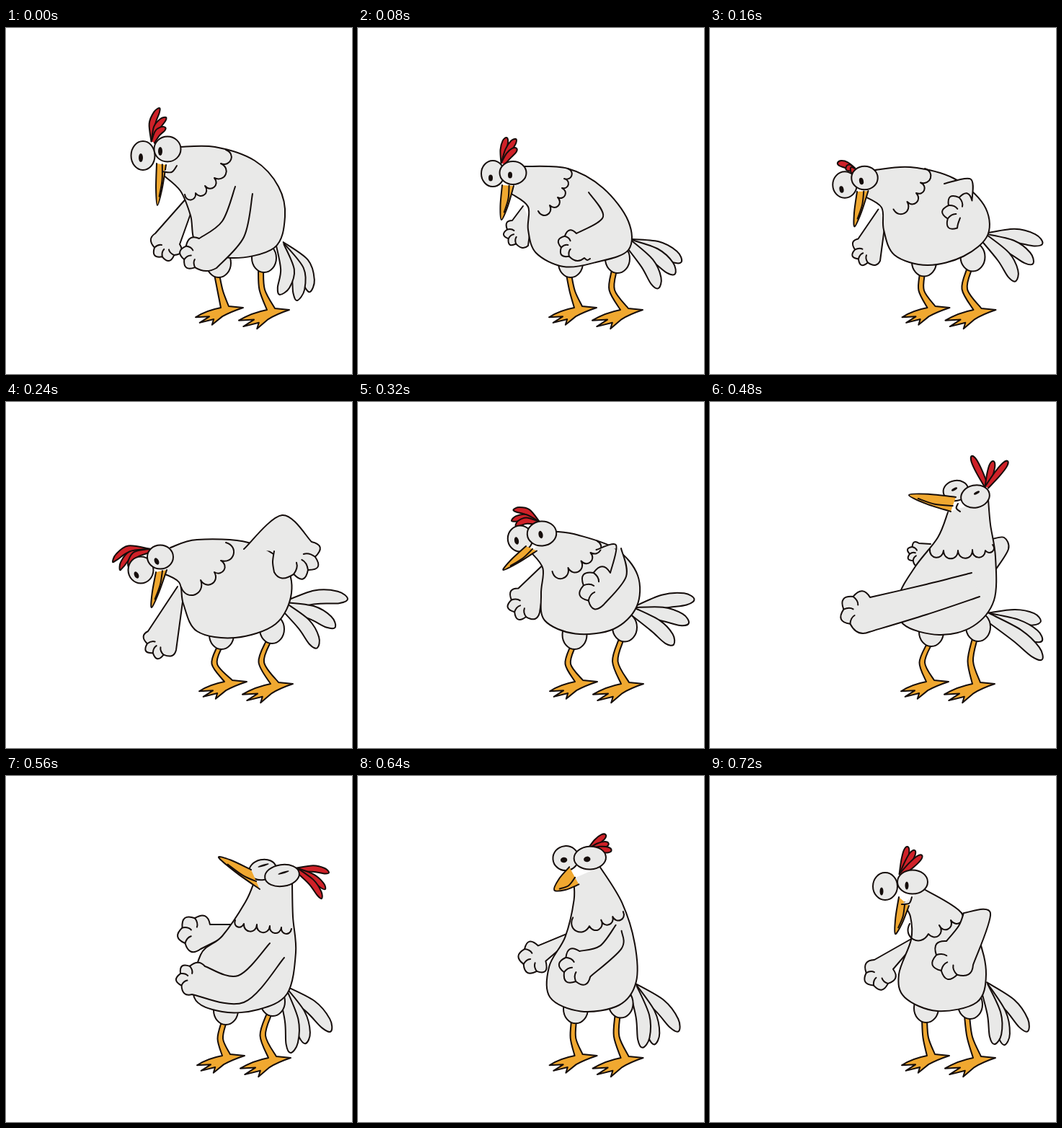
An HTML page with a canvas for the animation above (800 ms loop, 480 by 480 pixels).

```html
<!DOCTYPE html>
<html lang="en">
<head>
<meta charset="utf-8">
<title>Dancing hen</title>
<style>
html, body { margin: 0; width: 100%; height: 100%; overflow: hidden; background: #fff; }
canvas { display: block; width: 100vw; height: 100vh; }
</style>
</head>
<body>
<canvas id="stage" width="480" height="480"></canvas>
<script>
const INK = '#150d0b', PLUME = '#e9e9e8', HORN = '#f0a830', RED = '#cf2128';
const STEP = 80;
const ctx = document.getElementById('stage').getContext('2d');

// body, collar, beak, smile, thighs: points. tail, crest: root, then three tips.
// eyes: centre, pupil, radii, tilt. hands: centre, radius, turning direction.
// legs: both knees and the shift of the feet.
const crouch = {
  body: [240, 165, 290, 165, 345, 184, 378, 220, 387, 262, 372, 305, 312, 319, 265, 300, 256, 260, 242, 226, 218, 204],
  collar: [305, 169, 298, 188, 289, 208, 276, 219, 263, 229, 248, 231],
  near: { up: [318, 220, 300, 268, 268, 292], hand: [264, 314, 21, -1], down: [292, 333, 330, 290, 342, 230] },
  far: { up: [253, 233, 207, 285], hand: [223, 301, 20, -1], down: [241, 300, 256, 258] },
  tail: [380, 300, 422, 366, 404, 378, 380, 370], sweep: -0.15,
  crest: [204, 158, 213, 111, 222, 124, 221, 138], curl: -0.12,
  farEye: [190, 177, 187, 180, 16.5, 20, 0], nearEye: [224, 168, 214, 171, 18.5, 17.5, 0], pupil: [3, 6, 0],
  beak: [209, 188, 222, 190, 210, 246], smile: [217, 199, 237, 191],
  thighs: [295, 326, 358, 319], legs: [297, 355, -2]
};
const duck = {
  body: [230, 192, 291, 195, 340, 222, 375, 268, 375, 308, 330, 325, 285, 331, 247, 312, 236, 280, 236, 248, 213, 230],
  collar: [291, 195, 286, 209, 283, 222, 277, 235, 266, 246, 250, 254],
  near: { up: [320, 228, 340, 262, 303, 285], hand: [298, 301, 19, -1], down: [314, 319, 318, 322, 322, 320] },
  far: { up: [229, 247, 214, 267], hand: [222, 284, 18, -1], down: [236, 302, 240, 270] },
  tail: [375, 298, 449, 324, 440, 341, 417, 361], sweep: -0.08,
  crest: [201, 188, 206, 152, 219, 154, 220, 167], curl: -0.05,
  farEye: [187, 202, 184, 208, 16, 18, 0], nearEye: [215, 201, 211, 204, 18.5, 16, 0], pupil: [3, 4.5, 0],
  beak: [200, 218, 216, 219, 199, 266],
  thighs: [295, 326, 360, 320], legs: [297, 352, 0]
};
const swing = {
  body: [228, 202, 265, 191, 336, 195, 385, 223, 396, 265, 374, 308, 318, 327, 265, 318, 246, 280, 240, 250, 213, 236],
  collar: [305, 195, 298, 220, 289, 236, 270, 247, 243, 257],
  near: { up: [330, 204, 383, 157, 424, 194], hand: [402, 212, 31, 1], down: [372, 236, 370, 222, 372, 207] },
  far: { up: [238, 256, 197, 318], hand: [214, 333, 21, -1], down: [236, 344, 246, 270] },
  tail: [385, 283, 474, 273, 457, 312, 432, 341], sweep: -0.08,
  crest: [200, 206, 148, 222, 158, 233, 170, 229], curl: 0.2,
  farEye: [187, 233, 181, 240, 17.5, 18.5, 0], nearEye: [214, 215, 209, 221, 18, 16.5, 0], pupil: [3, 5, -25],
  beak: [208, 236, 223, 233, 202, 285],
  thighs: [299, 323, 369, 315], legs: [289, 354, 3]
};
const rise = {
  body: [316, 157, 345, 178, 380, 213, 391, 258, 377, 303, 335, 322, 285, 316, 253, 288, 262, 252, 273, 212, 266, 180],
  collar: [358, 190, 347, 198, 330, 205, 313, 213, 296, 213, 275, 205],
  near: { up: [331, 206, 333, 240, 276, 280], hand: [270, 305, 23, -1], down: [310, 326, 374, 262, 358, 199] },
  far: { up: [273, 198, 248, 199], hand: [250, 224, 24, -1], down: [268, 240, 273, 215] },
  tail: [378, 298, 459, 274, 461, 301, 444, 332], sweep: -0.04,
  crest: [301, 130, 283, 77, 268, 96, 267, 114], curl: 0.12,
  farEye: [263, 146, 259, 145, 17, 17.5, 0], nearEye: [296, 150, 298, 147, 22.5, 17.5, -8], pupil: [3, 5.5, 0],
  beak: [258, 164, 273, 180, 201, 181], smile: [267, 174, 292, 168],
  thighs: [302, 323, 371, 310], legs: [293, 359, -1]
};
const point = {
  body: [386, 135, 389, 170, 396, 215, 394, 275, 365, 311, 318, 323, 268, 308, 262, 270, 285, 228, 316, 188, 330, 153],
  collar: [392, 198, 382, 206, 364, 205, 344, 206, 324, 206, 305, 204],
  near: { up: [363, 237, 300, 253, 222, 271], hand: [207, 290, 25, -1], down: [221, 319, 300, 295, 374, 270] },
  far: { up: [306, 197, 290, 196], hand: [290, 210, 15, -1], down: [292, 226, 306, 205] },
  elbow: [392, 190, 408, 188, 414, 204, 396, 233],
  tail: [385, 298, 459, 304, 461, 331, 461, 357], sweep: -0.05,
  crest: [384, 118, 363, 75, 393, 82, 413, 82], curl: 0,
  farEye: [341, 123, 339, 121, 17.5, 14, -10], nearEye: [368, 131, 370, 126, 20, 15.5, -12], pupil: [4.5, 1.6, -28],
  beak: [341, 132, 334, 152, 276, 129], smile: [344, 141, 347, 152],
  thighs: [307, 319, 372, 312], legs: [294, 361, 0]
};
const lean = {
  body: [397, 148, 398, 195, 402, 245, 390, 302, 350, 324, 300, 327, 261, 307, 270, 248, 300, 222, 332, 175, 345, 145],
  collar: [396, 212, 382, 210, 366, 208, 348, 206, 330, 205, 318, 200],
  near: { up: [366, 232, 322, 277, 276, 264], hand: [258, 281, 20, -1], down: [258, 303, 330, 314, 386, 252] },
  far: { up: [312, 206, 283, 206], hand: [264, 218, 24, -1], down: [270, 240, 300, 225] },
  tail: [383, 295, 451, 354, 416, 371, 395, 384], sweep: -0.08,
  crest: [403, 130, 448, 134, 443, 157, 438, 170], curl: -0.08,
  farEye: [356, 130, 357, 124, 19, 14, -12], nearEye: [383, 138, 385, 134, 24, 15, -8], pupil: [8, 1.3, -17],
  beak: [340, 130, 352, 157, 295, 113],
  thighs: [305, 325, 370, 313], legs: [297, 356, 0]
};
const settle = {
  body: [295, 156, 345, 186, 372, 225, 383, 275, 370, 314, 315, 326, 270, 307, 262, 275, 279, 227, 278, 195, 268, 178],
  collar: [349, 190, 334, 200, 318, 207, 303, 219, 277, 205],
  near: { up: [352, 190, 345, 208, 328, 229], hand: [337, 253, 27, -1], down: [365, 262, 389, 190, 352, 190] },
  far: { up: [281, 225, 228, 255], hand: [235, 274, 21, -1], down: [254, 268, 278, 240] },
  tail: [380, 290, 441, 354, 409, 373, 395, 372], sweep: -0.08,
  crest: [265, 137, 274, 98, 284, 103, 294, 110], curl: 0,
  farEye: [243, 153, 238, 160, 17, 19, 0], nearEye: [281, 147, 273, 152, 21, 16.5, 0], pupil: [2.5, 5.5, 0],
  beak: [262, 168, 276, 180, 257, 219], smile: [266, 178, 280, 168],
  thighs: [300, 322, 361, 317], legs: [299, 360, 1]
};

function blend(a, b, t) {
  if (typeof a === 'number') return a + (b - a) * t;
  if (Array.isArray(a)) return a.slice(0, b.length).map((v, i) => blend(v, b[i], t));
  const out = {};
  for (const k in a) if (k in b) out[k] = blend(a[k], b[k], t);
  return out;
}

// Pulls the head up and stretches the neck below it.
function stretch(pose, lift) {
  const up = y => y - lift * Math.min(1, Math.max(0, (230 - y) / 90));
  const out = { ...pose };
  for (const k of ['body', 'collar', 'crest', 'beak', 'farEye', 'nearEye'])
    out[k] = pose[k].map((v, i) => i % 2 && !(k.endsWith('Eye') && i > 3) ? up(v) : v);
  return out;
}

const pairs = list => list.flatMap((v, i) => i % 2 ? [] : [[v, list[i + 1]]]);

function finish(fill) {
  if (fill) {
    ctx.fillStyle = fill;
    ctx.fill();
  }
  ctx.stroke();
}

// Smooth curve through points, continuing the current path if "join" is set.
function curve(p, join) {
  ctx[join ? 'lineTo' : 'moveTo'](...p[0]);
  for (let i = 0; i < p.length - 1; i++) {
    const a = p[i - 1] || p[i], b = p[i], c = p[i + 1], d = p[i + 2] || c;
    ctx.bezierCurveTo(b[0] + (c[0] - a[0]) / 6, b[1] + (c[1] - a[1]) / 6,
      c[0] - (d[0] - b[0]) / 6, c[1] - (d[1] - b[1]) / 6, ...c);
  }
}

function shape(points, fill) {
  ctx.beginPath();
  curve(points, false);
  finish(fill);
}

function oval(x, y, rx, ry, tilt, fill, outline) {
  ctx.beginPath();
  ctx.ellipse(x, y, rx, ry, tilt * Math.PI / 180, 0, 2 * Math.PI);
  ctx.fillStyle = fill;
  ctx.fill();
  if (outline) ctx.stroke();
}

function feathers(list, width, bend, fill) {
  const [[x, y], ...tips] = pairs(list);
  for (const [tx, ty] of tips) {
    const dx = tx - x, dy = ty - y, len = Math.hypot(dx, dy);
    const at = (s, side) => {
      const off = bend * 4 * s * (1 - s) + side * width / len;
      return [x + dx * s - dy * off, y + dy * s + dx * off];
    };
    shape([at(0, -0.5), at(0.5, -0.85), at(0.86, -0.75), at(1, 0), at(0.86, 0.75), at(0.5, 0.85), at(0, 0.5)], fill);
  }
}

function arm({ up, hand: [x, y, r, turn], down }) {
  const top = pairs(up), low = pairs(down), fingers = 4;
  const angle = p => Math.atan2(p[1] - y, p[0] - x);
  const polar = (a, d) => [x + Math.cos(a) * d, y + Math.sin(a) * d];
  const from = angle(top[top.length - 1]), dir = turn > 0 ? 1 : -1, full = 2 * Math.PI;
  const sweep = dir * (((dir * (angle(low[0]) - from)) % full + full) % full);
  ctx.beginPath();
  curve(top);
  for (let k = 1; k <= fingers; k++) {
    const end = k < fingers ? polar(from + sweep * k / fingers, r * 0.87) : low[0];
    ctx.quadraticCurveTo(...polar(from + sweep * (k - 0.5) / fingers, r * 1.45), ...end);
  }
  curve(low, true);
  finish(PLUME);
  for (let k = 1; k < fingers; k++) {
    const a = from + sweep * k / fingers;
    ctx.beginPath();
    ctx.moveTo(...polar(a, r * 0.87));
    ctx.quadraticCurveTo(...polar(a - dir * 0.3, r * 0.6), ...polar(a - dir * 0.2, r * 0.35));
    ctx.stroke();
  }
}

function scallops(list) {
  const p = pairs(list);
  ctx.beginPath();
  ctx.moveTo(...p[0]);
  for (let i = 1; i < p.length; i++) {
    const [ax, ay] = p[i - 1], [bx, by] = p[i];
    const nx = (by - ay) * 0.75, ny = (ax - bx) * 0.75;
    ctx.bezierCurveTo(ax + nx, ay + ny, bx + nx, by + ny, bx, by);
  }
  ctx.stroke();
}

function leg(hx, hy, kx, ax, ay, size) {
  const toes = [[-40, 14], [-34, 22], [-16, 25]].map(([x, y]) => [ax + x * size, ay + y * size]);
  const ky = (hy + ay) / 2;
  ctx.beginPath();
  curve([[hx - 3, hy], [kx - 3.5, ky], [ax - 3, ay]]);
  ctx.quadraticCurveTo(ax - 24, ay + 4, ...toes[0]);
  toes.forEach(([x, y], i) => {
    const next = toes[i + 1] || [ax + 12, ay + 10];
    const gap = [ax + (x + next[0] - 2 * ax) * 0.27, ay + (y + next[1] - 2 * ay) * 0.36];
    ctx.lineTo(...gap);
    if (toes[i + 1]) ctx.lineTo(...next);
  });
  ctx.quadraticCurveTo(ax + 10, ay + 6, ax + 28, ay);
  ctx.lineTo(ax + 8, ay - 2);
  curve([[ax + 8, ay - 2], [kx + 4, ky], [hx + 4, hy]], true);
  finish(HORN);
}

function beak(list) {
  const [l, r, t] = pairs(list);
  const mix = (a, b, s) => [a[0] + (b[0] - a[0]) * s, a[1] + (b[1] - a[1]) * s];
  const puff = (a, other) => {
    const m = mix(a, t, 0.6);
    return [m[0] + (a[0] - other[0]) * 0.12, m[1] + (a[1] - other[1]) * 0.12];
  };
  shape([l, puff(l, r), t, puff(r, l), r], HORN);
  const root = mix(l, r, 0.6);
  shape([root, mix(puff(r, l), root, 0.35), mix(t, r, 0.22)]);
}

function paint(p) {
  ctx.fillStyle = '#fff';
  ctx.fillRect(0, 0, 480, 480);
  ctx.strokeStyle = INK;
  ctx.lineWidth = 2;
  ctx.lineCap = ctx.lineJoin = 'round';

  feathers(p.tail, 11, p.sweep, PLUME);
  if (p.elbow) shape(pairs(p.elbow), PLUME);
  arm(p.far);
  const [left, right] = pairs(p.thighs), [kneeL, kneeR, shift] = p.legs;
  leg(left[0] - 3, left[1] + 16, kneeL, 303 + shift, 388, 0.95);
  leg(right[0] - 5, right[1] + 16, kneeR, 367 + shift, 391, 1.05);
  for (const [x, y] of [left, right]) oval(x, y, 17, 20, 0, PLUME, true);
  shape(pairs(p.body), PLUME);
  scallops(p.collar);
  arm(p.near);

  feathers(p.crest, 5, p.curl, RED);
  const eye = ([x, y, px, py, rx, ry, tilt]) => {
    oval(x, y, rx, ry, tilt, PLUME, true);
    oval(px, py, ...p.pupil, INK);
  };
  eye(p.farEye);
  beak(p.beak);
  if (p.smile) {
    const [a, b] = pairs(p.smile);
    const mid = [(a[0] + b[0]) / 2 - (b[1] - a[1]) * 0.35, (a[1] + b[1]) / 2 + (b[0] - a[0]) * 0.25];
    shape([a, mid, b], PLUME);
  }
  eye(p.nearEye);
}

const cycle = [
  crouch, duck, blend(duck, swing, 0.5), swing, blend(swing, rise, 0.5),
  rise, point, lean, stretch(blend(lean, settle, 0.6), 31), settle
];

let shown = -1;
const start = performance.now();
function tick() {
  const i = Math.floor((performance.now() - start) / STEP) % cycle.length;
  if (i !== shown) paint(cycle[shown = i]);
  requestAnimationFrame(tick);
}
tick();
</script>
</body>
</html>
```
